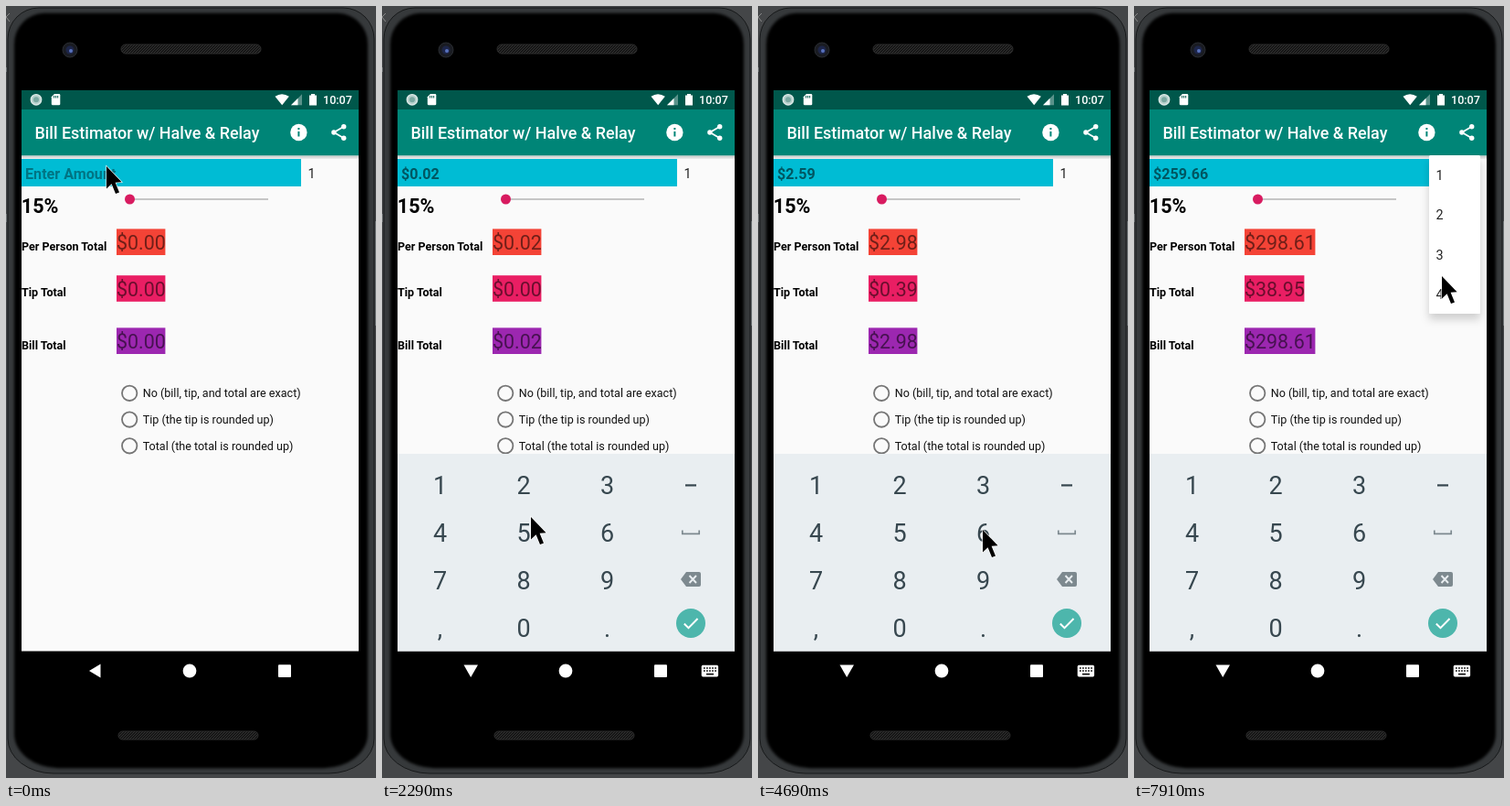
An HTML page that plays this animation: 405 by 843 pixels, repeating every 8000 ms.

```html
<!DOCTYPE html>
<html lang="en">
<head>
<meta charset="utf-8">
<title>Bill Estimator</title>
<style>
  html, body { margin: 0; width: 100%; height: 100%; overflow: hidden; background: #444648; }
  svg { display: block; width: 405px; height: 843px; font-family: Roboto, sans-serif; }
  .label { font-size: 12.57px; font-weight: 700; }
  .option { font-size: 12.57px; fill: #111; }
  .value { font-size: 21.4px; fill: rgba(0, 0, 0, .54); }
  .item { font-size: 14.37px; fill: #222; }
  .key { font-size: 27px; fill: #37474f; text-anchor: middle; }
</style>
</head>
<body>
<svg viewBox="0 0 405 843" xmlns="http://www.w3.org/2000/svg">
  <defs>
    <linearGradient id="barShadow" x2="0" y2="1">
      <stop offset="0" stop-color="#c4c7c6"/><stop offset="1" stop-color="#eeeeee"/>
    </linearGradient>
    <pattern id="mesh" width="3" height="3" patternUnits="userSpaceOnUse">
      <rect width="3" height="3" fill="#151515"/><path d="M0 3L3 0" stroke="#3a3a3a" stroke-width=".8"/>
    </pattern>
    <path id="body" d="M2 36A34 34 0 0 1 36 2H369A34 34 0 0 1 403 36V800A50 38 0 0 1 353 838H52A50 38 0 0 1 2 800Z"/>
    <filter id="blur"><feGaussianBlur stdDeviation="1.6"/></filter>
    <filter id="soft" x="-60%" y="-30%" width="220%" height="160%">
      <feDropShadow dx="0" dy="6" stdDeviation="5" flood-opacity=".18"/>
    </filter>
    <clipPath id="screen"><rect x="17" y="92" width="369" height="612.5"/></clipPath>
    <clipPath id="below"><rect x="17" y="163" width="369" height="541.5"/></clipPath>
  </defs>

  <!-- handset -->
  <rect width="405" height="843" fill="#444648"/>
  <path d="M4 8L0 12L4 17" fill="none" stroke="#8a8a8a"/>
  <use href="#body" fill="#36393b" stroke="#17191a"/>
  <use href="#body" fill="#000" filter="url(#blur)" transform="translate(202.5 420) scale(.965 .986) translate(-202.5 -420)"/>
  <path d="M.5 67V72M.5 227V236M404.5 235V349" stroke="#6d7274"/>
  <rect x="126" y="42" width="153" height="10" rx="5" fill="url(#mesh)" stroke="#2c2c2c"/>
  <rect x="123" y="792" width="153" height="9" rx="4.5" fill="url(#mesh)" stroke="#2c2c2c"/>
  <circle cx="70" cy="48" r="8" fill="#1a1c22" stroke="#292c31"/>
  <circle cx="70" cy="48" r="4.5" fill="#1d2548"/>
  <circle cx="71" cy="49" r="2" fill="#5872bd"/>

  <!-- app -->
  <g clip-path="url(#screen)">
    <rect x="17" y="92" width="369" height="613" fill="#fafafa"/>
    <rect x="17" y="92" width="369" height="21.5" fill="#00574b"/>
    <rect x="17" y="113" width="369" height="50.5" fill="#008577"/>
    <rect x="17" y="163.5" width="369" height="3.5" fill="url(#barShadow)"/>

    <g fill="#fff">
      <circle cx="33" cy="102.3" r="5.7" fill="#b7d0cc" stroke="#dce9e7" stroke-width="1.4"/>
      <circle cx="33" cy="102.3" r="3" fill="#7ba9a2"/>
      <path d="M53 96H58Q59.3 96 59.3 97.2V107Q59.3 108.2 58 108.2H51Q49.8 108.2 49.8 107V99.2Z"/>
      <path d="M52.7 98V100.5M54.7 98V100.5M56.7 98V100.5" stroke="#00574b"/>
      <path d="M294.5 98.8Q302 93.5 309.8 98.8L302.2 108.3Z"/>
      <path d="M324 96.2V108.3H312Z" opacity=".35"/>
      <path d="M319.5 100.7V108.3H312Z"/>
      <path d="M332 97.5H334V96H338V97.5H340V108.5H332Z"/>
      <text x="347" y="107" font-size="12.57" font-weight="500">10:07</text>
      <text x="31.4" y="145.3" font-size="17.96" font-weight="500">Bill Estimator w/ Halve &amp; Relay</text>
      <circle cx="320.4" cy="138" r="9.2"/>
      <path d="M320.4 137V142.6M320.4 133V135" stroke="#008577" stroke-width="2"/>
      <path d="M369.7 131.7L358.9 138L369.7 144.3" fill="none" stroke="#fff" stroke-width="1.8"/>
      <circle cx="369.7" cy="131.7" r="2.7"/><circle cx="358.9" cy="138" r="2.7"/><circle cx="369.7" cy="144.3" r="2.7"/>
    </g>

    <rect x="17" y="167" width="306" height="30" fill="#00bcd4"/>
    <text id="amount" x="21" y="188.6" font-size="16.16" font-weight="700"></text>
    <text class="item" x="330.6" y="188.2">1</text>
    <text x="16.8" y="225.6" font-size="21.55" font-weight="700">15%</text>
    <path d="M135 211H287" stroke="#c6c6c6" stroke-width="1.8"/>
    <circle cx="135.5" cy="211" r="5.5" fill="#d81b60"/>
    <g id="totals"></g>
    <g id="options"></g>

    <g id="keyboard">
      <rect x="17" y="489" width="369" height="216" fill="#e9eef1"/>
      <rect id="press" width="91" height="52" fill="#dfe5e8"/>
      <g id="keys"></g>
      <rect x="332" y="522.3" width="12" height="2.2" fill="#37474f"/>
      <path d="M328.8 572.5V576.3H347.2V572.5" fill="none" stroke="#7d898f" stroke-width="1.7"/>
      <path d="M333 618H347Q349 618 349 620V632Q349 634 347 634H333L327 626Z" fill="#7d898f"/>
      <path d="M336.5 622L344 630M344 622L336.5 630" stroke="#e9eef1" stroke-width="1.9"/>
      <circle cx="338" cy="674" r="16" fill="#4db6ac"/>
      <path d="M330.8 674.5L335.5 679.2L345.5 669" fill="none" stroke="#fff" stroke-width="2"/>
    </g>
  </g>

  <!-- navigation bar -->
  <g fill="#fff">
    <path id="back" d="M103.5 718.5V733.5L91 726Z"/>
    <path id="hide" d="M89.5 719.5H105L97.2 733Z"/>
    <circle cx="201" cy="726" r="7.4"/>
    <rect x="298" y="719.3" width="14" height="13.7" rx="1"/>
    <g id="ime">
      <rect x="349.7" y="719.8" width="18.4" height="12.6" rx="1.6"/>
      <path d="M352 723H366M352 726H366" stroke="#000" stroke-width="1.6" stroke-dasharray="1.7 1.35"/>
      <path d="M355 729.6H363" stroke="#000" stroke-width="1.6"/>
    </g>
  </g>

  <g clip-path="url(#below)">
    <g id="menu">
      <rect x="323" y="163" width="56" height="173" rx="1.5" fill="#fff" filter="url(#soft)"/>
      <g id="items"></g>
    </g>
  </g>

  <path id="cursor" d="M1 1V25.5L6.6 20.2L11 31L15 29.4L10.6 18.8L17.6 18.3Z" stroke="#fff" stroke-width="1.2" paint-order="stroke"/>
</svg>

<script>
const LOOP = 8000;
const STEP = 120; // ms between two positions of a moving part
const IME_ICON = 130, KEYBOARD_OPEN = 430, MENU_OPEN = 7050;
const ROW = 52, COLUMN = 91.5;
const $ = id => document.getElementById(id);

const home = { x: 109, y: 174 };
const moves = [
  { start: 1070, steps: 5, x: 165, y: 523 },
  { start: 1890, steps: 4, x: 162, y: 557 },
  { start: 2710, steps: 6, x: 228, y: 567 },
  { start: 3500, steps: 1, x: 235, y: 567 },
  { start: 4150, steps: 3, x: 246, y: 620 },
  { start: 4690, steps: 1, x: 245, y: 571 },
  { start: 6110, steps: 4, x: 340, y: 187 },
  { start: 7430, steps: 5, x: 336, y: 294 }
];
const typed = [
  { time: 2020, digit: 2 }, { time: 2440, digit: 5 }, { time: 4690, digit: 9 },
  { time: 4930, digit: 6 }, { time: 5610, digit: 6 }
];

// Progress from 0 to 1 in even hard steps, the first one taken at the start time.
const stepped = (t, start, steps) =>
  Math.min(1, Math.max(0, Math.floor((t - start) / STEP) + 1) / steps);
const easeOut = p => 1 - (1 - p) ** 2.5;
const mix = (a, b, p) => a + (b - a) * p;
const money = n => '$' + (Math.round(n * 100 + 1e-6) / 100).toFixed(2);

function pointerAt(t) {
  return moves.reduce((from, move) => {
    const p = easeOut(stepped(t, move.start, move.steps));
    return { x: mix(from.x, move.x, p), y: mix(from.y, move.y, p) };
  }, home);
}

$('totals').innerHTML = [
  ['Per Person Total', 243.4, '#f44336'],
  ['Tip Total', 294.2, '#e91e63'],
  ['Bill Total', 351.4, '#9c27b0']
].map(([name, y, color]) => `
  <text class="label" x="17" y="${y + 23.1}">${name}</text>
  <rect x="121" y="${y}" height="28.6" fill="${color}"/>
  <text class="value" x="121" y="${y + 22.4}"></text>`).join('');
const boxes = $('totals').querySelectorAll('rect');
const values = $('totals').querySelectorAll('.value');

$('options').innerHTML = [
  'No (bill, tip, and total are exact)', 'Tip (the tip is rounded up)', 'Total (the total is rounded up)'
].map((text, i) => `
  <circle cx="135.2" cy="${422.8 + i * 28.75}" r="8.2" fill="none" stroke="#757575" stroke-width="1.8"/>
  <text class="option" x="149.7" y="${427.3 + i * 28.75}">${text}</text>`).join('');

$('keys').innerHTML = [...'123456789,0.'].map((key, i) =>
  `<text class="key" x="${63.5 + i % 3 * COLUMN}" y="${533 + Math.floor(i / 3) * ROW}">${key}</text>`).join('');

$('items').innerHTML = [1, 2, 3, 4].map((n, i) =>
  `<text class="item" x="330.6" y="${190.3 + i * 43.1}">${n}</text>`).join('');

function show(id, visible) {
  $(id).style.display = visible ? '' : 'none';
}

function renderAmounts(t) {
  const cents = typed.filter(key => key.time <= t).reduce((sum, key) => sum * 10 + key.digit, 0);
  const amount = cents / 100, tip = amount * .15;
  $('amount').textContent = cents ? money(amount) : 'Enter Amount';
  $('amount').setAttribute('fill', `rgba(0, 0, 0, ${cents ? .54 : .38})`);
  [amount + tip, tip, amount + tip].forEach((sum, i) => {
    const text = money(sum);
    values[i].textContent = text;
    boxes[i].setAttribute('width', 53.4 + 12 * (text.length - 5));
  });
}

function renderKeyboard(t) {
  const open = stepped(t, KEYBOARD_OPEN, 2);
  $('keyboard').setAttribute('opacity', open);
  $('keyboard').setAttribute('transform', `translate(0 ${48 * (1 - open)})`);
  show('back', t < IME_ICON);
  show('hide', t >= IME_ICON);
  show('ime', t >= IME_ICON);

  const pressed = typed.find(key => t >= key.time - STEP && t < key.time);
  show('press', pressed);
  if (pressed) {
    const i = pressed.digit - 1;
    $('press').setAttribute('x', 18 + i % 3 * COLUMN);
    $('press').setAttribute('y', 498 + Math.floor(i / 3) * ROW);
  }
}

function render(t) {
  const { x, y } = pointerAt(t);
  $('cursor').setAttribute('transform', `translate(${x} ${y})`);
  renderAmounts(t);
  renderKeyboard(t);

  const open = stepped(t, MENU_OPEN, 3);
  show('menu', open);
  $('menu').setAttribute('opacity', open);
  $('menu').setAttribute('transform', `translate(351 163) scale(${mix(.5, 1, open)}) translate(-351 -163)`);
}

const start = performance.now();
function tick() {
  render((performance.now() - start) % LOOP);
  requestAnimationFrame(tick);
}
tick();
</script>
</body>
</html>
```
